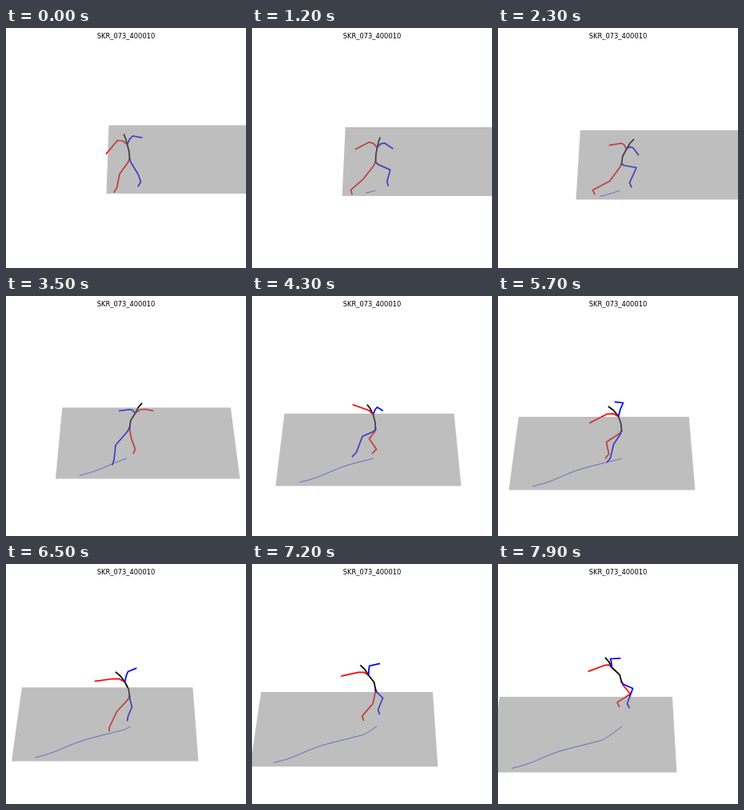
These frames come from a looping animation (300 px wide and 300 px high, 8000 ms). An HTML page with a canvas:

```html
<!DOCTYPE html>
<html lang="en">
<head>
<meta charset="utf-8">
<title>Motion capture</title>
<style>
html, body { margin: 0; height: 100%; overflow: hidden; background: #fff; }
canvas { display: block; width: 100vw; height: 100vh; }
</style>
</head>
<body>
<canvas width="300" height="300"></canvas>
<script>
const ctx = document.querySelector('canvas').getContext('2d');
const LOOP = 8, STEP = 0.1;

// Key poses: time in s, floor corner, hip height, sideways lean of chest and head,
// then knee and ankle of each leg, elbow and hand of each arm.
const poses = [];
function pose(time, corner, hipY, lean, nod, redLeg, blueLeg, redArm, blueArm) {
  poses.push({ time, values: [...corner, hipY, lean, nod, ...redLeg, ...blueLeg, ...redArm, ...blueArm] });
}
pose(0, [125, 206.5], 163, -3, -4,
  [141.5, 182, 138, 199.5], [165, 183, 168, 192], [139, 140, 125, 156.5], [158, 134.5, 169, 136.5]);
pose(2.3, [97, 214], 169, 6, 9,
  [139, 191, 118, 202], [172.5, 174, 164, 193], [154, 143.5, 139, 146], [168, 149, 175, 158]);
pose(3.5, [61.5, 228], 164, 7, 8,
  [156, 177, 161, 191], [136.5, 186, 134.5, 205], [174, 141, 183, 143], [153, 141.5, 141.5, 143]);
pose(4.3, [29, 237], 166, -3, -7,
  [146, 178, 155, 191], [137.5, 175, 130, 195], [140, 140.5, 126, 135.5], [156, 138.5, 162.5, 142.5]);
pose(5.7, [13, 242], 168, -4, -12,
  [135, 182, 138, 197], [144, 185, 140, 202], [136, 147, 114.5, 158], [156, 133, 146, 132]);
pose(6.5, [6.5, 246], 165, -6, -11,
  [138, 184, 129, 203], [157, 178, 152, 190], [133, 143, 111, 146], [152, 134, 162, 130]);
pose(7.9, [-13, 260], 147, -12, -8,
  [165, 162, 148.5, 172.5], [168, 155, 161, 174], [133, 126, 113, 133.5], [140, 118, 152, 117.5]);

// Smooth cubic through the key poses
function sample(t) {
  const n = poses.length;
  let i = 0;
  while (i < n - 2 && poses[i + 1].time < t) i++;
  const slope = (a, b, k) => (poses[b].values[k] - poses[a].values[k]) / (poses[b].time - poses[a].time);
  const tangent = (j, k) => slope(Math.max(j - 1, 0), Math.min(j + 1, n - 1), k);
  const a = poses[i], b = poses[i + 1], span = b.time - a.time;
  const u = (t - a.time) / span, v = 1 - u;
  return a.values.map((p, k) =>
    p * v * v * (1 + 2 * u) + b.values[k] * u * u * (3 - 2 * u) +
    span * u * v * (v * tangent(i, k) - u * tangent(i + 1, k)));
}

const between = (a, b, k, drop) => [a[0] + (b[0] - a[0]) * k, a[1] + (b[1] - a[1]) * k + drop];

function trace(points) {
  ctx.beginPath();
  for (const [x, y] of points) ctx.lineTo(x, y);
}

function stroke(points, color, width = 1.75) {
  trace(points);
  ctx.strokeStyle = color;
  ctx.lineWidth = width;
  ctx.stroke();
}

// Past footing drifts with the floor.
function drawTrail(t, x, y) {
  const points = [];
  for (let s = 0; s < t + STEP / 2; s += STEP) {
    const [fx, fy] = sample(s);
    points.push([152.5 + 2.5 * Math.cos(s * Math.PI / 3.5) + x - fx, 202.7 + (y - fy) * 0.975]);
  }
  stroke(points, '#00f', 0.7);
}

function drawLeg(hip, [kx, ky, ax, ay], color, t) {
  const knee = [kx, ky], ankle = [ax, ay];
  const toe = [ax - 1.5 + 4 * Math.cos((t - 1.9) * 2 * Math.PI / 5.9), ay + 5];
  stroke([hip, between(hip, knee, 0.15, 1.5), knee, ankle, toe], color);
}

function drawArm(chest, [ex, ey, hx, hy], color) {
  const elbow = [ex, ey];
  stroke([chest, between(chest, elbow, 0.45, -2), elbow, [hx, hy]], color);
}

function drawFigure(t, hipY, lean, nod, limbs) {
  const hip = [154, hipY], chest = [154 + lean, hipY - 18], head = [chest[0] + nod, chest[1] - 12];
  const waist = [154 + lean * 0.2, hipY - 9];
  drawLeg(hip, limbs.slice(0, 4), '#f00', t);
  drawLeg(hip, limbs.slice(4, 8), '#00f', t);
  stroke([hip, waist, chest, between(chest, head, 0.5, -1.5), head], '#000');
  drawArm(chest, limbs.slice(8, 12), '#f00');
  drawArm(chest, limbs.slice(12), '#00f');
}

function drawFloor(x, y) {
  const top = 121 + (y - 206.5) * 0.832;
  const left = x + 3 + (125 - x) * 0.0835;
  const grow = (y - 228) * 0.17;
  trace([[left, top], [left + 210.5 + grow, top], [x + 230.5 + grow, y], [x, y]]);
  ctx.fillStyle = 'rgba(128,128,128,.51)';
  ctx.fill();
}

function draw(t) {
  const [x, y, hipY, lean, nod, ...limbs] = sample(t);
  ctx.setTransform(1, 0, 0, 1, 0, 0);
  ctx.fillStyle = '#fff';
  ctx.fillRect(0, 0, 300, 300);
  ctx.fillStyle = '#000';
  ctx.font = '8.33px "DejaVu Sans", sans-serif';
  ctx.textAlign = 'center';
  ctx.fillText('SKR_073_400010', 150, 12.9);

  ctx.translate(0.5, 0.5);
  ctx.lineJoin = 'round';
  ctx.lineCap = 'square';
  if (t > 0) drawTrail(t, x, y);
  drawFigure(t, hipY, lean, nod, limbs);
  drawFloor(x, y); // translucent, lies over the figure
}

const start = performance.now();
function tick() {
  const t = (performance.now() - start) / 1000 % LOOP;
  draw(Math.floor(t / STEP) * STEP);
  requestAnimationFrame(tick);
}
tick();
</script>
</body>
</html>
```
